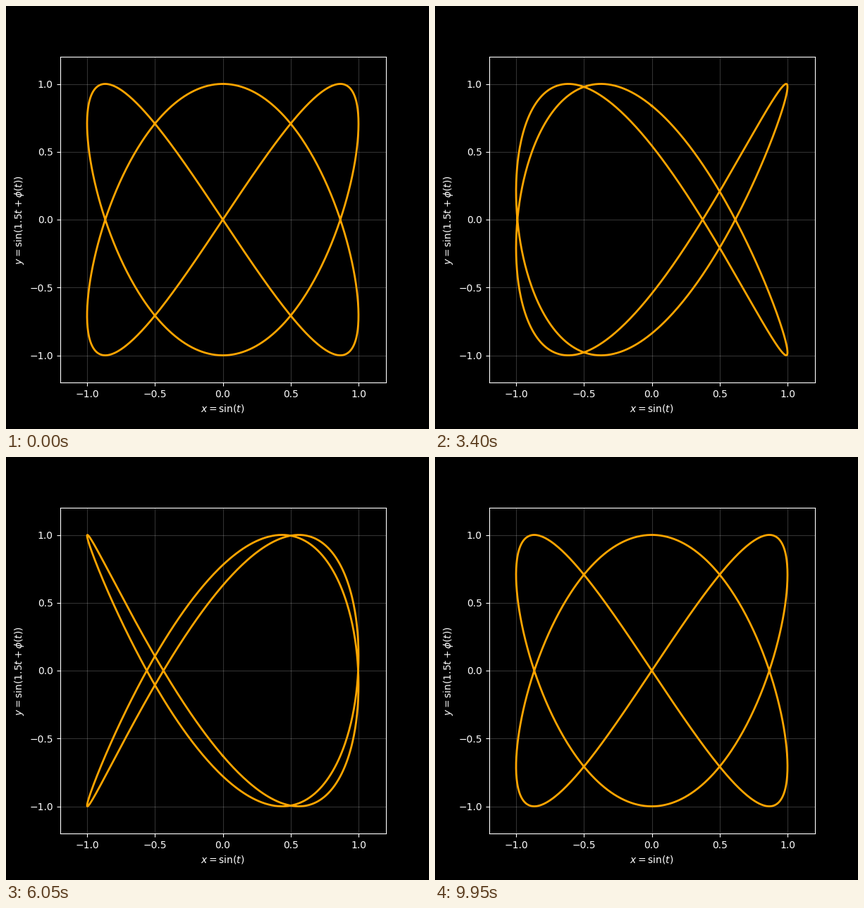
A matplotlib script that plays this animation: 600x600 px, repeating every 10000 ms.

```python
import numpy as np
import matplotlib.pyplot as plt
from matplotlib.animation import FuncAnimation

FRAMES = 200
INTERVAL = 50  # ms

plt.style.use("dark_background")

t = np.linspace(0, 4 * np.pi, 1000)
x = np.sin(t)
phases = np.linspace(0, 2 * np.pi, FRAMES)

fig, ax = plt.subplots(figsize=(6, 6), dpi=100)
ax.set_xlim(-1.2, 1.2)
ax.set_ylim(-1.2, 1.2)
ax.set_aspect("equal")
ax.grid(True, alpha=0.2)
ax.set_xlabel(r"$x = \sin(t)$")
ax.set_ylabel(r"$y = \sin(1.5t + \phi(t))$")

curve, = ax.plot([], [], color="orange", lw=2)


def update(frame):
    curve.set_data(x, np.sin(1.5 * t + phases[frame]))
    return curve,


anim = FuncAnimation(fig, update, frames=FRAMES, interval=INTERVAL,
                     repeat=True, repeat_delay=0)
plt.show()
```
